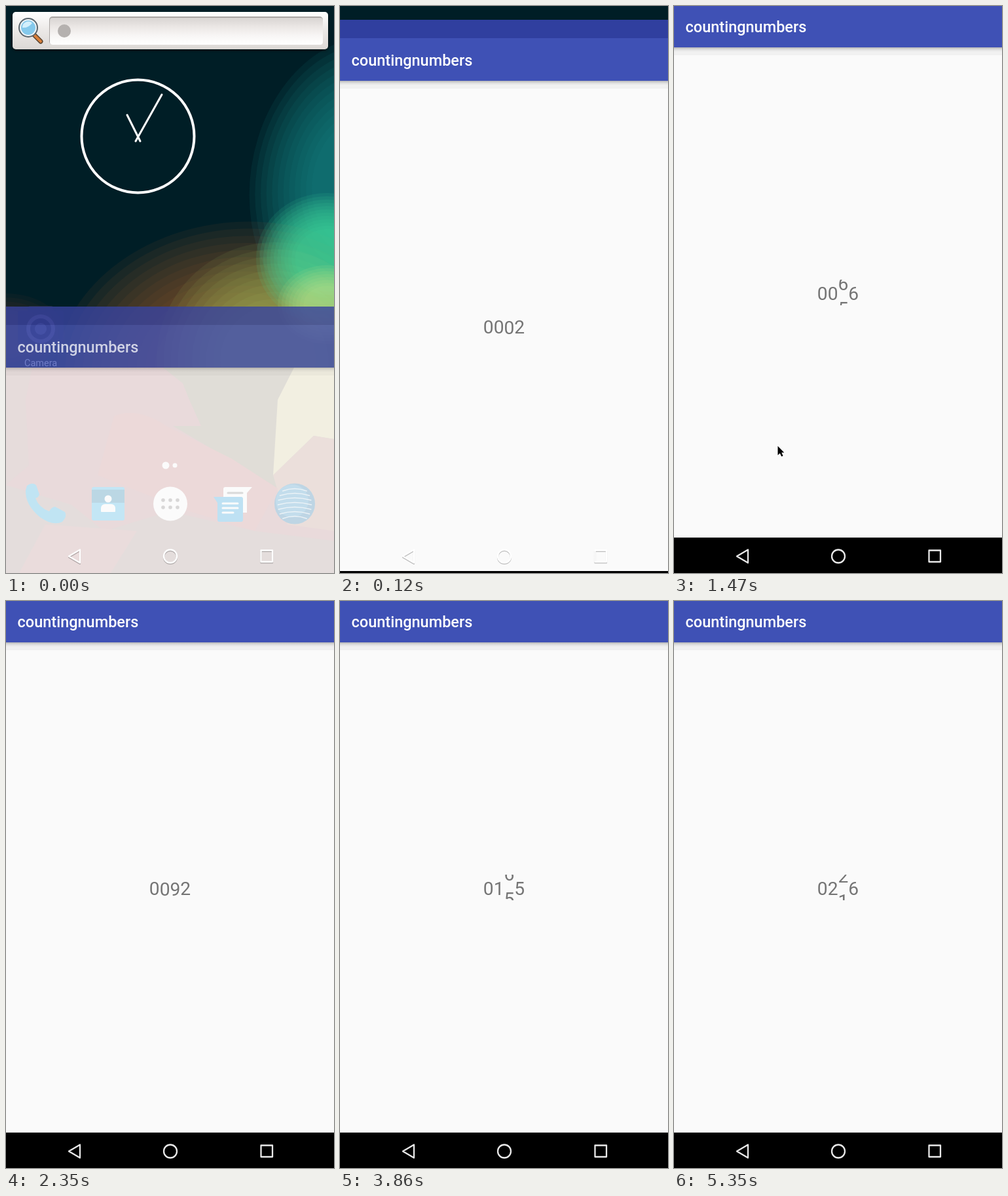
Recreate the animation shown at these times as an HTML page with a canvas. Size 501x864 px, loop 5.45 s.

```html
<!DOCTYPE html>
<html>
<head>
<meta charset="utf-8">
<style>
  html, body { margin: 0; width: 100%; height: 100%; overflow: hidden; background: #001e26; }
  canvas { display: block; }
</style>
</head>
<body>
<canvas id="stage" width="501" height="864"></canvas>
<script>
const W = 501, H = 864, LOOP = 5450, STEP = 58.4, LAST = 91;
const ctx = document.getElementById('stage').getContext('2d');

// step, shown count, phase of the tens wheel
const COUNT = [[0, 0, 0], [2, 2.5, .14], [6, 11.5, 1.13], [25, 56.5, 5.57],
               [55, 128.5, 12.72], [76, 179.5, 17.95], [91, 216.5, 21.5]];
// step, pointer x, pointer y
const POINTER = [[22, 144, 652], [25, 158, 670], [26, 170, 685], [29, 311, 787]];

const clamp = x => Math.max(0, Math.min(1, x));
const ease = x => (1 - Math.cos(Math.PI * x)) / 2;

function interpolate(keys, step, column) {
  let i = 1;
  while (i < keys.length - 1 && keys[i][0] < step) i++;
  const a = keys[i - 1], b = keys[i];
  return a[column] + (b[column] - a[column]) * clamp((step - a[0]) / (b[0] - a[0]));
}

function rect(x, y, w, h, fill, radius = 0) {
  ctx.fillStyle = fill;
  ctx.beginPath();
  ctx.roundRect(x, y, w, h, radius);
  ctx.fill();
}

function circle(x, y, r, fill) {
  ctx.fillStyle = fill;
  ctx.beginPath();
  ctx.arc(x, y, r, 0, 7);
  ctx.fill();
}

function shape(path, fill) {
  ctx.fillStyle = fill;
  ctx.fill(new Path2D(path));
}

function line(path, color, width) {
  ctx.strokeStyle = color;
  ctx.lineWidth = width;
  ctx.stroke(new Path2D(path));
}

function text(string, x, y, font, fill) {
  ctx.font = font + ' Roboto, sans-serif';
  ctx.fillStyle = fill;
  ctx.fillText(string, x, y);
}

function vertical(y0, y1, ...colors) {
  const g = ctx.createLinearGradient(0, y0, 0, y1);
  colors.forEach((c, i) => g.addColorStop(i / (colors.length - 1), c));
  return g;
}

// Banded light: stacked translucent ellipses
function glow(x, y, rx, ry, tilt, rgb, alpha, bands = 10) {
  ctx.fillStyle = `rgba(${rgb},${alpha})`;
  for (let i = 0; i < bands; i++) {
    const s = 1 - i * .6 / bands;
    ctx.beginPath();
    ctx.ellipse(x, y, rx * s, ry * s, tilt, 0, 7);
    ctx.fill();
  }
}

function wallpaper() {
  rect(0, 0, W, H, '#001e26');
  ctx.save();
  ctx.beginPath();
  ctx.rect(0, 0, W, 552);
  ctx.clip();
  glow(545, 270, 172, 225, .15, '24,140,134', .1, 12);
  glow(0, 500, 90, 62, 0, '110,50,40', .08, 6);
  glow(350, 545, 275, 215, -.15, '150,82,50', .095, 12);
  glow(410, 540, 180, 180, -.2, '165,190,95', .085, 10);
  glow(490, 385, 108, 100, 0, '70,220,155', .11, 12);
  glow(490, 455, 75, 60, 0, '205,225,130', .1, 8);
  rect(0, 458, W, 94, 'rgba(150,120,130,.25)');
  ctx.restore();

  rect(0, 551, W, 313, 'rgb(184,122,128)');
  shape('M0 551H40L30 600 35 700 0 730Z', 'rgb(170,130,126)');
  shape('M240 551H501V720L420 740 340 690 255 640 298 640 280 600 270 575Z', 'rgb(146,134,112)');
  shape('M440 551H501V660L470 655 408 715 415 600Z', 'rgb(220,206,152)');
  shape('M408 715L470 655 501 660V800L430 790Z', 'rgb(192,145,128)');
  shape('M165 625Q200 610 245 640L345 690 415 735 380 800 280 770 140 715Z', 'rgb(196,118,118)');
  shape('M0 730L100 760 150 800 250 770 380 800 501 815V864H0Z', 'rgb(164,136,130)');
  shape('M60 790L200 800 160 864H20Z', 'rgb(186,132,132)');
}

function searchBar() {
  ctx.shadowColor = 'rgba(0,0,0,.6)';
  ctx.shadowBlur = 4;
  ctx.shadowOffsetY = 2;
  rect(10, 9, 482, 57, vertical(9, 66, '#fff', '#ebe8e6', '#dcd8d5'), 5);
  ctx.shadowColor = 'transparent';
  rect(66, 16, 418, 43, '#a9a5a3', 5);
  rect(67, 18, 417, 41, vertical(18, 59, '#d8d4d2', '#ebe7e5', '#f8f6f5', '#fff'), 4);
  circle(89, 38, 10, '#b5b1af');
  line('M42 43L53 54', '#55422f', 7);
  line('M43 44L53 54', '#d97f3a', 4);
  circle(34, 33, 15, '#59646c');
  circle(34, 33, 13, '#eef4f7');
  circle(34, 33, 11, '#85c9ec');
  shape('M25 33A9 9 0 0 1 40 26Q34 34 25 33Z', '#d3effc');
}

function clock() {
  ctx.strokeStyle = '#fff';
  ctx.lineWidth = 4;
  ctx.beginPath();
  ctx.arc(201.5, 198.5, 86, 0, 7);
  ctx.stroke();
  line('M205 206L185 166M198 206L238 135', '#fff', 3);
}

function homeIcons() {
  // camera
  rect(18, 464, 70, 51, 'rgba(50,50,75,.65)', 4);
  rect(34, 457, 38, 10, 'rgba(50,50,75,.65)', 3);
  circle(53, 492, 22, 'rgba(110,100,140,.7)');
  circle(53, 492, 16, 'rgba(35,35,65,.8)');
  circle(53, 492, 9, 'rgba(95,90,130,.8)');
  text('Camera', 28, 549, '14.5px', '#fff');
  // page dots
  circle(244, 700, 5.5, '#fff');
  circle(258, 700, 3.5, '#fff');
  // phone
  shape('M32 731Q40 725 46 730L51 744Q50 749 45 750Q50 764 66 770Q70 763 75 763L90 771Q94 777 86 786Q72 793 52 779Q29 760 30 738Z', 'rgb(20,165,225)');
  // contacts
  rect(131, 733, 50, 51, 'rgb(30,170,230)', 3);
  rect(131, 737, 50, 20, 'rgb(0,110,165)');
  circle(156, 751, 5.5, '#fff');
  rect(145, 759, 22, 12, '#fff', [6, 6, 1, 1]);
  // drawer
  circle(251, 758.5, 26, '#fff');
  for (const x of [240, 251, 262])
    for (const y of [753, 764]) circle(x, y, 2.8, 'rgb(115,110,110)');
  // messages
  shape('M332 736Q332 733 335 733H376L368 742V772H332Z', '#fff');
  line('M339 742H361', 'rgb(120,120,120)', 3);
  shape('M317 748H359Q362 748 362 751V783Q362 786 359 786H326Q323 786 323 783V757Z', 'rgb(10,150,225)');
  line('M331 758H354M331 765H354M331 772H347', '#fff', 3);
  // globe
  circle(441, 758.5, 31, 'rgb(10,105,165)');
  circle(437, 754, 25, 'rgb(30,135,195)');
  for (let i = 0; i < 7; i++) {
    const y = 737 + i * 7, half = Math.sqrt(900 - (y - 758) ** 2) * .85;
    line(`M${441 - half} ${y + 2}Q441 ${y - 5} ${441 + half} ${y + 2}`, 'rgba(255,255,255,.75)', 1.5);
  }
}

function digit(value, index, y) {
  ctx.fillText(((value % 10) + 10) % 10, 218.8 + index * 15.83, y);
}

// Digits descend as the wheel position grows
function wheel(position, index) {
  const base = Math.floor(position), part = position - base, pitch = 38;
  digit(base, index, 447.5 + part * pitch);
  if (part > 0) digit(base + 1, index, 447.5 - (1 - part) * pitch);
}

function counter(step) {
  const count = Math.floor(interpolate(COUNT, step, 1));
  const phase = interpolate(COUNT, step, 2);
  const turned = ease(phase % 1);
  const carry = phase % 10 >= 9 ? turned : 0;
  ctx.save();
  ctx.beginPath();
  ctx.rect(210, 417, 82, 39);
  ctx.clip();
  ctx.font = '28.2px Roboto, sans-serif';
  ctx.fillStyle = '#757575';
  wheel(0, 0);
  wheel(Math.floor(phase / 10) + carry, 1);
  wheel(Math.floor(phase) + turned, 2);
  wheel(count, 3);
  ctx.restore();
}

function appWindow(step) {
  const offset = Math.round(488 * Math.max(0, 1 - step / 5.51) ** 5);
  ctx.save();
  ctx.globalAlpha = Math.min(1, .75 + .2 * step);
  ctx.translate(0, offset);
  rect(0, 63, W, H, '#fafafa');
  rect(0, 63, W, 12, 'rgba(0,0,0,.035)');
  rect(0, 63, W, 7, vertical(63, 70, 'rgba(0,0,0,.24)', 'rgba(0,0,0,.07)', 'rgba(0,0,0,0)'));
  rect(0, -30, W, 28, '#303f9f');
  rect(0, -2, W, 65, '#3f51b5');
  text('countingnumbers', 17.5, 39.5, '500 23.5px', '#fff');
  counter(step);
  ctx.restore();
}

function navigation(step) {
  const dark = clamp((step - 2) / 3);
  const icons = 'M96 838.5L113 828.5V848.5ZM261 838.5A10 10 0 1 1 241 838.5A10 10 0 1 1 261 838.5ZM389.5 829.5H407V847H389.5Z';
  if (step >= 1) rect(0, 861, W, 3, '#000');
  rect(0, 810, W, 54, `rgba(0,0,0,${dark})`);
  if (dark < 1) {
    ctx.save();
    ctx.translate(0, 1.5);
    line(icons, 'rgba(0,0,0,.25)', 2.2);
    ctx.restore();
  }
  line(icons, dark < 1 ? '#fff' : '#e8e8e8', 2.3);
}

function pointer(step) {
  if (step < POINTER[0][0] || step > POINTER[POINTER.length - 1][0]) return;
  ctx.save();
  ctx.translate(interpolate(POINTER, step, 1), interpolate(POINTER, step, 2));
  const arrow = 'M.5 .5V14.5L3.8 11.5 6.2 16.5 8.6 15.4 6.3 10.5H10.3Z';
  line(arrow, '#fff', 2);
  shape(arrow, '#000');
  ctx.restore();
}

function draw(time) {
  const step = Math.min(LAST, Math.floor((time + 10) / STEP));
  ctx.lineCap = 'round';
  if (step < 6) {
    wallpaper();
    ctx.save();
    ctx.globalAlpha = [1, .4][step] || 0;
    searchBar();
    clock();
    homeIcons();
    ctx.restore();
  }
  ctx.lineCap = 'butt';
  appWindow(step);
  ctx.lineJoin = 'round';
  navigation(step);
  pointer(step);
}

const start = performance.now();
function tick() {
  draw((performance.now() - start) % LOOP);
  requestAnimationFrame(tick);
}
tick();
</script>
</body>
</html>
```
